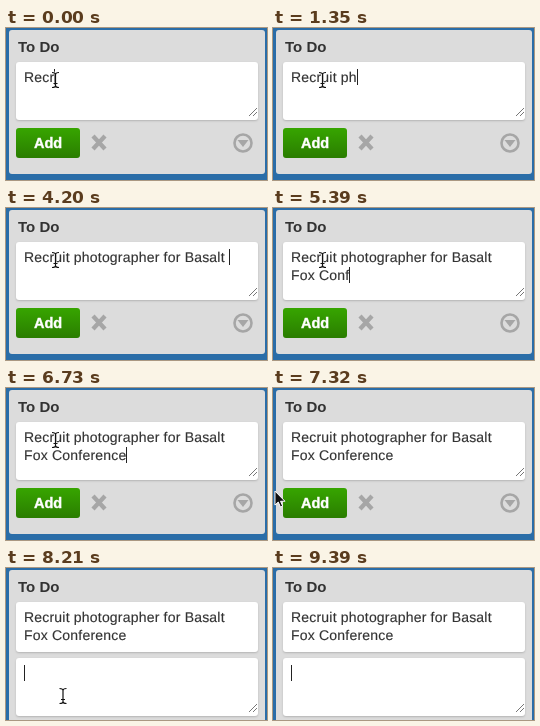
Animation of 261 by 152 pixels, one loop 9850 ms. Source, as an HTML page:

```html
<!DOCTYPE html>
<html lang="en">
<head>
<meta charset="utf-8">
<title>To Do</title>
<style>
html, body { margin: 0; width: 100%; height: 100%; overflow: hidden; }
body { position: relative; background: #2a6da8; color: #333; font: 14px/18px "Liberation Sans", Arial, sans-serif; }
div, svg, h2 { position: absolute; box-sizing: border-box; }
#list { left: 3px; top: 2px; width: 256px; height: 144px; border-radius: 3px; background: #dcdcdc; }
h2 { left: 12px; top: 10px; margin: 0; font-size: 15px; }
.box { left: 10px; width: 242px; height: 58px; border-radius: 3px; background: #fff; box-shadow: 0 1px 2px #b4b4b4; }
#card { top: 34px; }
#next { top: 90px; }
.text { left: 8px; top: 6px; width: 226px; white-space: pre-wrap; letter-spacing: .2px; text-rendering: geometricPrecision; -webkit-text-stroke: .15px; }
.caret { border-left: 1px solid #222; margin-right: -1px; }
.grip { right: 1px; bottom: 4px; width: 8px; height: 8px; stroke: #777; }
#add { left: 10px; top: 100px; width: 64px; height: 30px; border-radius: 3px; color: #fff; font: bold 14.5px/31px "Liberation Sans", Arial, sans-serif; text-align: center; -webkit-text-stroke: .4px; background: linear-gradient(#37a500, #2a7d00); }
#add.hover { background: linear-gradient(#2f8b00, #246a00); }
#icons, #pointer { left: 0; top: 0; }
.done #list { height: 170px; }
.done #card { height: 50px; }
.done #add, .done #icons, .done #card .grip, .done #card .caret, body:not(.done) #next { display: none; }
</style>
</head>
<body>
<div id="list"></div>
<h2>To Do</h2>
<div id="card" class="box">
  <div class="text"><span id="typed"></span><span class="caret"></span></div>
  <svg class="grip"><path d="M0 8L8 0M4 8L8 4"/></svg>
</div>
<div id="next" class="box">
  <div class="text"><span class="caret"></span>&#8203;</div>
  <svg class="grip"><path d="M0 8L8 0M4 8L8 4"/></svg>
</div>
<div id="add">Add</div>
<svg id="icons" width="261" height="152" fill="none" stroke="#a6a6a6">
  <path d="M87 108L99 121M99 108L87 121" stroke-width="4.3"/>
  <circle cx="237" cy="115" r="8.5" stroke-width="2.6"/>
  <path d="M231.500 112H242.500L237 119Z" fill="#a6a6a6" stroke="none"/>
</svg>
<svg id="pointer" width="261" height="152">
  <defs><path id="stem" d="M-3.500 -7.500Q0 -7.500 0 -5.500Q0 -7.500 3.500 -7.500M0 -6V6M-3.500 7.500Q0 7.500 0 5.500Q0 7.500 3.500 7.500M-2 3.500H2"/></defs>
  <g id="beam" fill="none">
    <use href="#stem" stroke="#fff" stroke-width="2.5" opacity=".7"/>
    <use href="#stem" stroke="#111" stroke-width="1.2"/>
  </g>
  <path id="arrow" d="M0 0V14L3.300 11L5.500 16L7.700 15L5.600 10.200H10Z" fill="#111" stroke="#fff"/>
  <g id="hand" stroke="#111" stroke-linejoin="round">
    <path d="M-1.500 1Q0 -1 1.500 1V6Q3 4.500 4.300 6.300Q6 5 7 7Q9.500 6.300 9.500 9V12Q9 14 8 15V17.500H0V15.500L-4.500 10Q-5.500 7.500 -3.500 7.500L-1.500 9.500Z" fill="#fff"/>
    <path d="M2 11V14.500M4.200 11V14.500M6.400 11V14.500" stroke-width=".8"/>
  </g>
</svg>
<script>
const LOOP = 9850, STEP = 149;
// Steps at which typing ends, the pointer leaves the text, and the card is added
const TYPED = 45, LEAVE = 47, ADDED = 55;
const BLINK = 500 / STEP + 0.1;

// Bursts of typing: text, first step, steps taken
const bursts = [
  ["Recr", 0, 1], ["u", 2, 1], ["it phot", 5, 6], ["ograph", 13, 5], ["er for ", 18, 4],
  ["Basalt ", 23, 6], ["Fox Conf", 30, 7], ["er", 38, 2], ["en", 42, 2], ["ce", 45, 1]
];
const $ = id => document.getElementById(id);
const clamp = v => Math.min(1, Math.max(0, v));
const curve = (p, a, b, c) => (1 - p) ** 2 * a + 2 * p * (1 - p) * b + p * p * c;

function textAt(step) {
  return bursts.map(([text, first, steps]) =>
    text.slice(0, Math.floor(text.length * clamp((step - first + 1) / steps)))).join("");
}

function pointerAt(step) {
  if (step < ADDED) {
    const p = clamp((step - LEAVE + 1) / 7);
    return [curve(p, 49.5, -50, 56), curve(p, 52, 130, 122)];
  }
  const p = clamp((step - ADDED - 2) / 5);
  return [57 + 128 * p, 128 + 37 * p];
}

function shapeAt(x, y, done) {
  const top = done ? 90 : 34;
  if (x > 10 && x < 252 && y > top && y < top + 58) return "beam";
  return !done && x > 10 && x < 74 && y > 100 && y < 130 ? "hand" : "arrow";
}

function draw(time) {
  const step = Math.floor(time % LOOP / STEP);
  const done = step >= ADDED;
  const [x, y] = pointerAt(step);
  const shape = shapeAt(x, y, done);
  $("typed").textContent = textAt(step);
  document.body.classList.toggle("done", done);
  $("add").classList.toggle("hover", shape === "hand");

  const idle = Math.max(0, step - (done ? ADDED : TYPED));
  const lit = Math.floor(idle / BLINK) % 2 === 0;
  for (const caret of document.querySelectorAll(".caret")) caret.style.visibility = lit ? "visible" : "hidden";

  for (const id of ["beam", "arrow", "hand"]) $(id).style.display = id === shape ? "" : "none";
  $(shape).setAttribute("transform", `translate(${x} ${y})`);
}

const start = performance.now();
function tick() {
  draw(performance.now() - start);
  requestAnimationFrame(tick);
}
tick();
</script>
</body>
</html>
```
